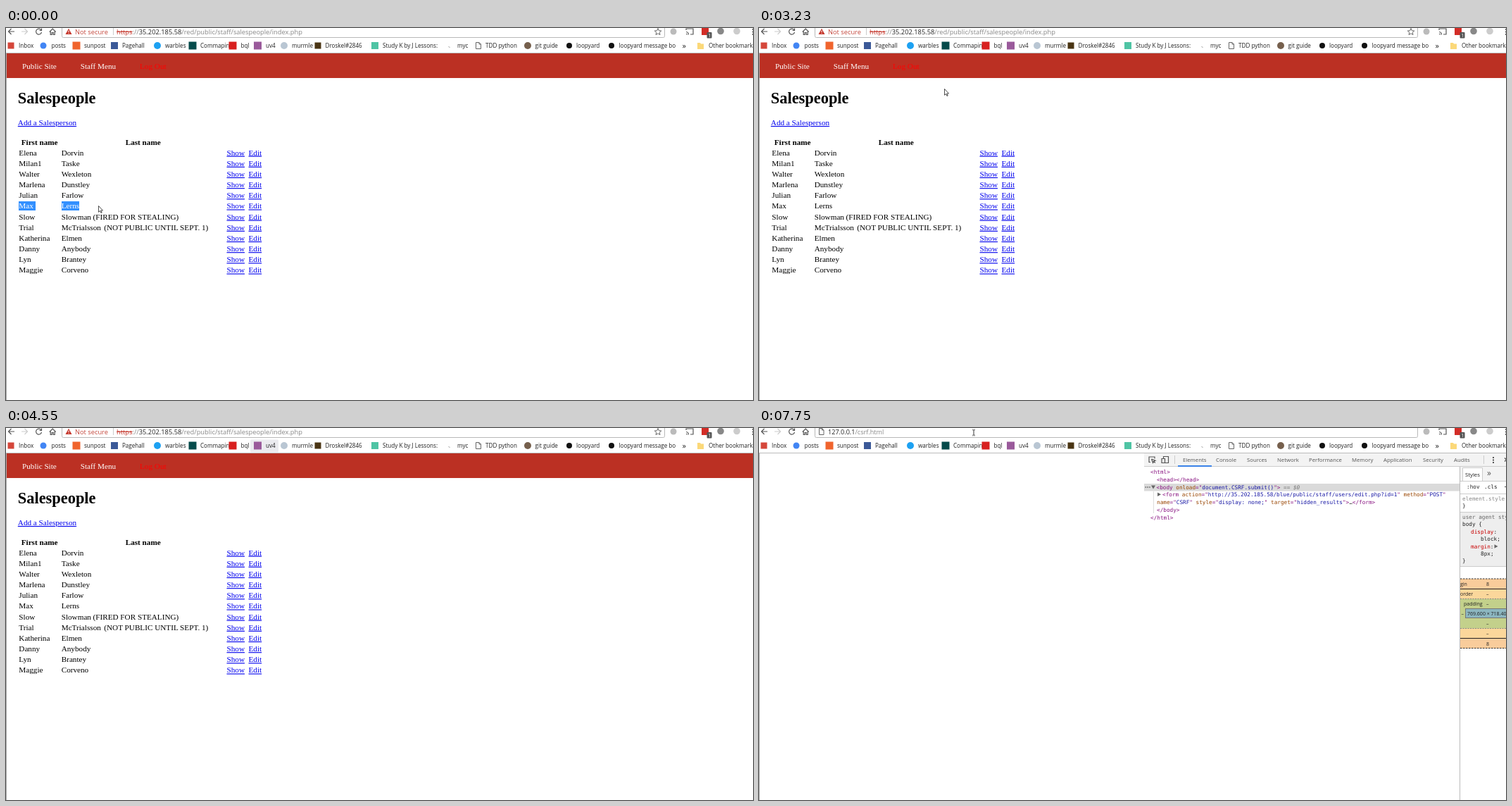
Write an HTML page that moves like this. It is 1061 px wide and 528 px high and loops after 8 s.

```html
<!DOCTYPE html>
<html lang="en">
<head>
<meta charset="utf-8">
<title>Salespeople</title>
<style>
html, body { margin: 0; width: 100%; height: 100%; overflow: hidden; background: #fff; }
svg { display: block; width: 1061px; height: 528px; }
text { white-space: pre; }
.ui { font-family: "Open Sans", "Noto Sans", sans-serif; fill: #222; }
.marks { font-size: 8.1px; }
.url { font-size: 9.3px; }
.tabs { font-size: 7.75px; fill: #555; }
.box { font-size: 7px; }
.page { font: 11.2px "Liberation Serif", "Noto Serif", serif; fill: #000; }
.link { fill: #00e; text-decoration: underline; }
.mono { font: 7.7px "DejaVu Sans Mono", "Liberation Mono", monospace; fill: #222; }
.tag { fill: #881280; }
.attr { fill: #994500; }
.val { fill: #1a1aa6; }
.prop { fill: #c80000; }
.soft { fill: #888; }
.line { fill: none; stroke: #555; stroke-width: 1.2; }

.site, .tools, .selected, .arrow, .beam, .caret, .hover { animation: 8s step-end infinite; }
.site { animation-name: site; }
.tools { animation-name: tools; }
.selected { animation-name: selected; }
.hover { animation-name: hover; }
.arrow { animation-name: arrow; }
.beam { animation-name: beam; }
.caret { animation-name: caret; }
@keyframes site { 0% { opacity: 1 } 72%, 100% { opacity: 0 } }
@keyframes tools { 0% { opacity: 0 } 72%, 100% { opacity: 1 } }
@keyframes selected { 0% { opacity: 1 } 6.25%, 100% { opacity: 0 } }
@keyframes hover { 0% { opacity: 0 } 44.125% { opacity: 1 } 72%, 100% { opacity: 0 } }
@keyframes arrow {
  0% { opacity: 1; transform: translate(131px, 252px) }
  36.625% { opacity: 1; transform: translate(160px, 212px) }
  38.5% { opacity: 1; transform: translate(236px, 103px) }
  40.375% { opacity: 1; transform: translate(263px, 86px) }
  42.25% { opacity: 1; transform: translate(312px, 63px) }
  44.125% { opacity: 1; transform: translate(357px, 22px) }
  45.625%, 100% { opacity: 0; transform: translate(386px, 8px) }
}
@keyframes beam {
  0% { opacity: 0; transform: translate(386px, 8px) }
  45.625% { opacity: 1; transform: translate(386px, 8px) }
  47.5% { opacity: 1; transform: translate(389px, 6px) }
  49% { opacity: 1; transform: translate(392px, 4px) }
  50.5% { opacity: 1; transform: translate(393px, 2px) }
  55.25% { opacity: 1; transform: translate(391px, -1px) }
  56.875% { opacity: 0; transform: translate(391px, -9px) }
  82% { opacity: 1; transform: translate(334.5px, 6px) }
  83.5% { opacity: 1; transform: translate(310.5px, 6.5px) }
  85.375%, 100% { opacity: 1; transform: translate(305px, 6.5px) }
}
@keyframes caret {
  0% { opacity: 0; transform: translate(154.5px, 0) }
  72% { opacity: 1; transform: translate(154.5px, 0) }
  77% { opacity: 0; transform: translate(154.5px, 0) }
  82% { opacity: 1; transform: translate(154.5px, 0) }
  88.75% { opacity: 1; transform: translate(177px, 0) }
  96.875%, 100% { opacity: 0; transform: translate(177px, 0) }
}
</style>
</head>
<body>
<svg viewBox="0 0 1061 528">
  <rect width="1061" height="528" fill="#fff"/>

  <!-- Toolbar -->
  <g class="line">
    <path d="M12 5H3.500M7.500 1L3.500 5L7.500 9"/>
    <path d="M22 5H30.500M26.500 1L30.500 5L26.500 9" stroke="#ccc"/>
    <path d="M49.800 2.700A4 4 0 1 0 50.500 6M50.500 .500V3.500H47.500"/>
    <path d="M61.800 5.500L66.200 1L70.600 5.500M63.200 5V9.500H65.200V6.500H67.200V9.500H69.200V5"/>
    <path d="M79.500 0V11.500Q79.500 13.500 81.500 13.500H933.500Q935.500 13.500 935.500 11.500V0" stroke="#b8b8b8" stroke-width="1"/>
    <path d="M0 35.500H1061" stroke="#bbb" stroke-width="1"/>
  </g>
  <circle cx="948" cy="5" r="4.500" fill="#bbb"/>
  <path class="line" d="M966 3V1H976V9H972M966 5.500A4 4 0 0 1 969.500 9.500M966 8A2 2 0 0 1 967.500 9.500"/>
  <rect x="988" width="10" height="10" fill="#d32d27"/>
  <rect x="995.500" y="6" width="7" height="8.500" rx="1" fill="#555"/>
  <text class="ui" x="997.300" y="13" font-size="7" style="fill:#fff">1</text>
  <circle cx="1015" cy="4.500" r="4.800" fill="#888"/>
  <circle cx="1038" cy="4.500" r="4.800" fill="#ccc"/>
  <path d="M1060 1h1v2h-1zM1060 4.500h1v2h-1zM1060 8h1v2h-1z" fill="#555"/>

  <rect class="hover" x="347" y="16.500" width="40" height="18" rx="1.500" fill="#ebebef"/>
  <g class="ui marks" id="bookmarks"></g>
  <path d="M667.500 20.500H672L674.500 23V29.500H667.500ZM672 20.500V23H674.500" fill="#fff" stroke="#666"/>
  <path d="M982 21h4l1 1.500h4V30h-9z" fill="#fbd879"/>
  <path d="M628.500 26.500l2 1" stroke="#999"/>

  <!-- Web page -->
  <g class="site">
    <path d="M89 .800L93.500 9H84.500Z" fill="#c5372c"/>
    <path d="M89 3.500V6M89 7V8" stroke="#fff"/>
    <g class="ui url">
      <text x="98" y="8.700" style="fill:#c5483e">Not secure</text>
      <path d="M152.500 0V10" stroke="#ccc"/>
      <text x="157" y="8.700"><tspan fill="#c5372c" text-decoration="line-through">https</tspan><tspan class="soft">://</tspan>35.202.185.58<tspan class="soft">/red/public/staff/salespeople/index.php</tspan></text>
    </g>
    <path d="M926 .500L927.400 3.800L930.800 4L928.200 6.300L929 9.600L926 7.800L923 9.600L923.800 6.300L921.200 4L924.600 3.800Z" fill="none" stroke="#666"/>
    <rect y="36" width="1061" height="35" fill="#bb3023"/>
    <g class="page">
      <g fill="#fff">
        <text x="23" y="58">Public Site</text>
        <text x="105.700" y="58">Staff Menu</text>
        <text x="190" y="58" fill="#f00">Log Out</text>
      </g>
      <text x="16.800" y="107" font-size="22.400" font-weight="bold">Salespeople</text>
      <text class="link" x="16.800" y="138">Add a Salesperson</text>
      <g font-weight="bold">
        <text x="21.700" y="165.500">First name</text>
        <text x="169.700" y="165.500">Last name</text>
      </g>
      <g id="people"></g>
      <g class="selected">
        <path d="M18 246H42V259H18ZM79 246H104V259H79Z" fill="#3390ff"/>
        <g id="picked" fill="#fff"></g>
      </g>
    </g>
  </g>

  <!-- Local page with developer tools -->
  <g class="tools">
    <path d="M85.500 .500H89.500L92 3V9.500H85.500ZM89.500 .500V3H92" fill="#fff" stroke="#666"/>
    <text class="ui" x="98" y="8.700" font-size="9.100">127.0.0.1<tspan class="soft">/csrf.html</tspan></text>

    <path d="M547 36H1061V54H547ZM996 55H1061V75H996Z" fill="#f3f3f3"/>
    <path d="M547 54.500H1061M996 75.500H1061M996 93.500H1061M996 119.500H1061M996 196.500H1061M590.500 39V51M1029.500 39V51" stroke="#ccc"/>
    <g class="line" stroke-width="1">
      <path d="M556 48.500H554V41H562V43.500"/>
      <path d="M557.500 44L563 46.300L560.600 47.200L562.800 49.500M557.500 44L559.500 49.500L560.600 47.200"/>
      <path d="M574.500 43V40.500H581.500V49.500H577M572 43.500H576.500V49.500H572Z"/>
      <path d="M1059 42.500L1064 47.500M1059 47.500L1064 42.500"/>
    </g>
    <path d="M1042 41h2v2h-2zM1042 44.500h2v2h-2zM1042 48h2v2h-2z" fill="#555"/>
    <g class="ui tabs" id="tabs"></g>
    <rect x="595" y="53" width="48" height="2" fill="#3b82e8"/>

    <rect x="547" y="79" width="448" height="10.500" fill="#dadada"/>
    <path d="M560.500 90V121" stroke="#ddd"/>
    <path d="M557 81.500H563L560 86.500ZM566 91.500L571 94.300L566 97Z" fill="#666"/>
    <path d="M548.500 84H556" stroke="#666" stroke-width="1.600" stroke-dasharray="1.600 1.200"/>
    <g class="mono">
      <g class="tag">
        <text x="556" y="65.300">&lt;html&gt;</text>
        <text x="565" y="76">&lt;head&gt;&lt;/head&gt;</text>
        <text x="564.500" y="86.700">&lt;body <tspan class="attr">onload</tspan>="<tspan class="val">document.CSRF.submit()</tspan>"&gt;</text>
        <text x="573" y="97.300">&lt;form <tspan class="attr">action</tspan>="<tspan class="val">http://35.202.185.58/blue/public/staff/users/edit.php?id=1</tspan>" <tspan class="attr">method</tspan>="<tspan class="val">POST</tspan>"</text>
        <text x="565" y="108"><tspan class="attr">name</tspan>="<tspan class="val">CSRF</tspan>" <tspan class="attr">style</tspan>="<tspan class="val">display: none;</tspan>" <tspan class="attr">target</tspan>="<tspan class="val">hidden_results</tspan>"&gt;<tspan fill="#222">…</tspan>&lt;/form&gt;</text>
        <text x="565" y="118.800">&lt;/body&gt;</text>
        <text x="556" y="129.600">&lt;/html&gt;</text>
      </g>
      <text x="745" y="86.700" font-style="italic" style="fill:#777">== $0</text>
    </g>

    <path d="M995.500 55V528" stroke="#bbb"/>
    <path d="M999.500 75V56.500H1027.500V75" fill="#fff" stroke="#ccc"/>
    <g class="ui tabs">
      <text x="1003" y="68.500" fill="#222">Styles</text>
      <text x="1034" y="68" font-size="12">»</text>
    </g>
    <rect x="996" y="120" width="65" height="76" fill="#eee"/>
    <g class="mono">
      <text x="1005" y="86">:hov</text>
      <text x="1030" y="86">.cls</text>
      <path d="M1059 83.500H1061" stroke="#555"/>
      <text class="soft" x="999" y="102.700">element.style {</text>
      <text x="999" y="113.300">}</text>
      <text x="999" y="128.700" style="fill:#666">user agent stylesheet</text>
      <text x="999" y="139">body {</text>
      <text class="prop" x="1011" y="149.800">display<tspan fill="#222">:</tspan></text>
      <text x="1025" y="160">block;</text>
      <text class="prop" x="1011" y="170.500">margin<tspan fill="#222">:</tspan></text>
      <path d="M1044.500 165.300L1049.500 168L1044.500 170.700Z" fill="#666"/>
      <text x="1025" y="180.700">8px;</text>
      <text x="999" y="191">}</text>
    </g>

    <path d="M996 214H1061V313H996Z" fill="#f9cc9b"/>
    <path d="M996 228H1061V299H996Z" fill="#fbd79b"/>
    <path d="M996 242.500H1061V284.500H996Z" fill="#c3d08b"/>
    <path d="M996 228.500H1061M996 298.500H1061" stroke="#222"/>
    <path d="M996 214H1061M996 312.500H1061" stroke="#333" stroke-dasharray="2.500 1.500"/>
    <path d="M996 242.500H1061M996 284.500H1061" stroke="#888" stroke-dasharray="2 1.500"/>
    <rect x="1003.500" y="256.500" width="60" height="13" fill="#8cb6c0" stroke="#777"/>
    <g class="ui box" id="boxModel"></g>
  </g>

  <rect y="36" width="1" height="492" fill="#aaa"/>
  <rect class="caret" width="1.100" height="10.500" fill="#222"/>
  <path class="arrow" d="M.500 .500V9.300L2.500 7.500L4 10.600L5.200 10L3.800 7H6.500Z" fill="#fff" stroke="#222" stroke-width=".8"/>
  <path class="beam" d="M-2 -4H-.500L0 -3.500L.500 -4H2M0 -3.500V3.500M-2 4H-.500L0 3.500L.500 4H2" fill="none" stroke="#222" stroke-width=".9"/>
</svg>
<script>
const fill = (id, html) => { document.getElementById(id).innerHTML = html; };
const label = (x, y, words, cls = "") => `<text x="${x}" y="${y}" class="${cls}">${words}</text>`;
const square = (x, color, size) =>
  `<rect x="${x - size / 2}" y="${25 - size / 2}" width="${size}" height="${size}" fill="${color}"/>`;
const disc = (x, color, size) => `<circle cx="${x}" cy="25" r="${size / 2}" fill="${color}"/>`;

// text x, text, icon x, icon colour, icon shape, icon size
const bookmarks = [
  [18, "Inbox", 7, "#d5463a", square, 9],
  [64.5, "posts", 53, "#4285f4", disc, 9],
  [111, "sunpost", 100, "#f0642d", square, 11],
  [165, "Pagehall", 154, "#3b5998", square, 10],
  [226, "warbles", 215, "#1da1f2", disc, 10],
  [276, "Commapin", 265, "#064b4b", square, 11],
  [333.5, "bql", 322, "#d8201f", square, 11],
  [369, "uv4", 357.5, "#9a5a9b", square, 11],
  [406, "murmle", 395, "#b9c6d3", disc, 10],
  [453.5, "Droskel#2846", 443, "#4a3513", square, 9],
  [535, "Study K by J Lessons:", 524, "#4fc4a4", square, 10],
  [641, "myc"],
  [681, "TDD python"],
  [751.5, "git guide", 741, "#76604d", disc, 10],
  [810, "loopyard", 800, "#111", disc, 8],
  [870.5, "loopyard message bo", 860, "#111", disc, 8],
  [998, "Other bookmarks"],
];
fill("bookmarks", bookmarks.map(([x, name, iconX, color, shape, size]) =>
  (shape ? shape(iconX, color, size) : "") + label(x, 28, name)).join("") +
  '<text x="960.500" y="28.500" font-size="11">»</text>');

const people = [
  ["Elena", "Dorvin"], ["Milan1", "Taske"], ["Walter", "Wexleton"], ["Marlena", "Dunstley"],
  ["Julian", "Farlow"], ["Max", "Lerns"], ["Slow", "Slowman", 123.5, "(FIRED FOR STEALING)"],
  ["Trial", "McTrialsson", 139.3, "(NOT PUBLIC UNTIL SEPT. 1)"], ["Katherina", "Elmen"],
  ["Danny", "Anybody"], ["Lyn", "Brantey"], ["Maggie", "Corveno"],
];
const rowY = i => 180.6 + i * 15.17;
const fullName = i => label(18.3, rowY(i), people[i][0]) + label(78.7, rowY(i), people[i][1]);
fill("people", people.map(([, , noteX, note], i) => fullName(i) +
  (note ? label(noteX, rowY(i), note) : "") +
  label(313.5, rowY(i), "Show", "link") + label(344.5, rowY(i), "Edit", "link")).join(""));
fill("picked", fullName(5));

const tabs = [[602, "Elements"], [649, "Console"], [693, "Sources"], [736, "Network"], [781, "Performance"],
  [842, "Memory"], [887, "Application"], [943, "Security"], [987, "Audits"]];
fill("tabs", tabs.map(([x, name]) => label(x, 48, name)).join(""));

const boxModel = [[996, 221, "gin"], [1033, 221, "8"], [996, 235, "order"], [1033, 235, "–"], [1001, 249, "padding"],
  [1033, 249, "–"], [997.5, 263, "–"], [1006, 263, "769.600 × 718.400"], [1033, 277, "–"], [1033, 291, "–"], [1033, 306, "8"]];
fill("boxModel", boxModel.map(([x, y, words]) => label(x, y + 2.5, words)).join(""));
</script>
</body>
</html>
```
